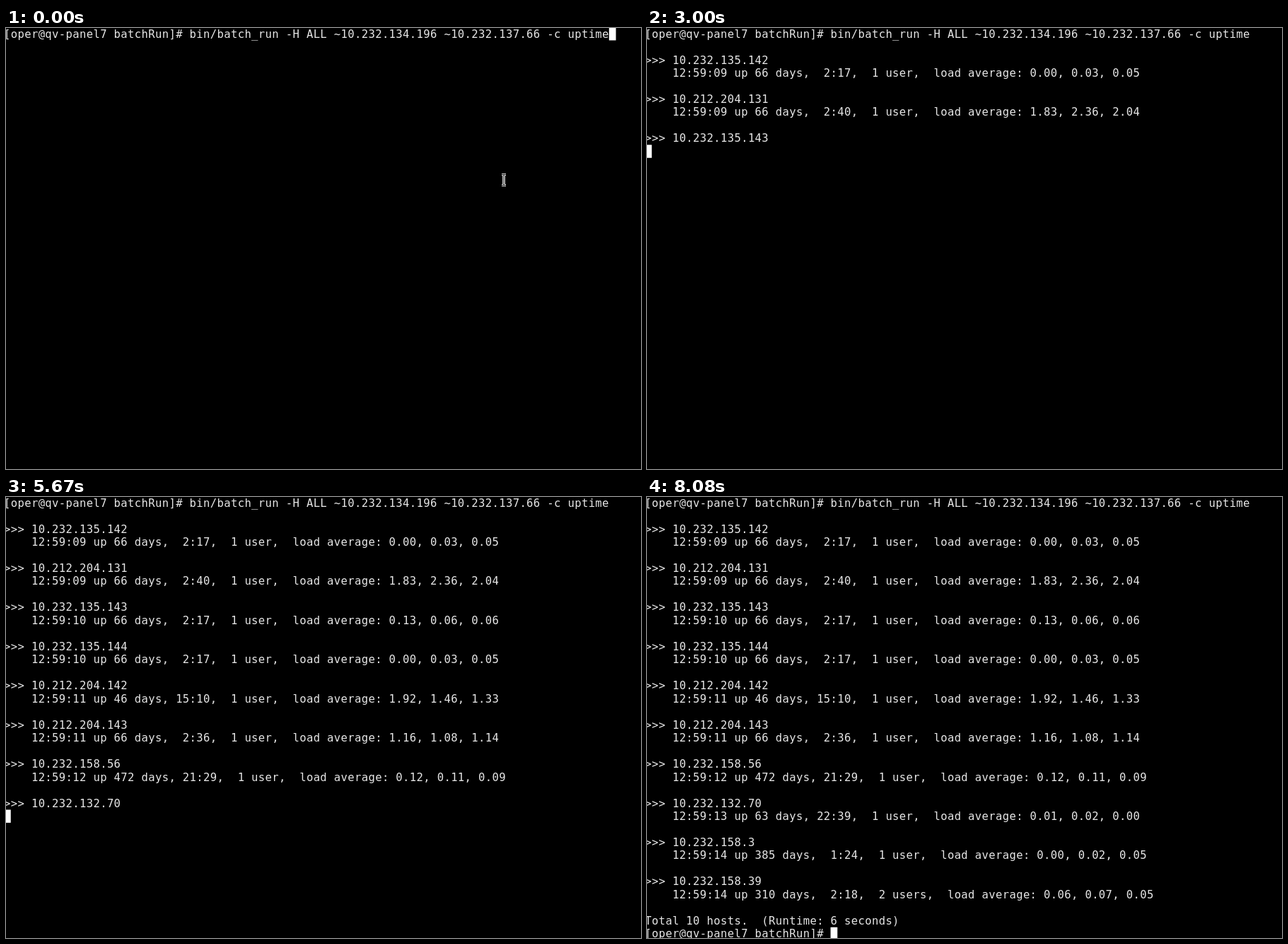
These frames come from a looping animation (898 px wide and 624 px high, 8660 ms). An HTML page:

```html
<!DOCTYPE html>
<html lang="en">
<head>
<meta charset="utf-8">
<title>Batch uptime</title>
<style>
html, body { margin: 0; width: 100%; height: 100%; overflow: hidden; background: #000; }
pre {
  position: absolute; left: -3px; top: -1px; margin: 0;
  font: 16px/19px "DejaVu Sans Mono", monospace;
  letter-spacing: calc(10px - 1ch);
  color: #e6e6e6;
  transform: scale(.9725); transform-origin: 0 0;
}
#caret { display: inline-block; width: 10px; height: 19px; vertical-align: top; background: #fff; }
#mouse { position: absolute; left: -5px; top: -10px; fill: none; }
</style>
</head>
<body>
<pre><span id="out"></span><span id="caret"></span></pre>
<svg id="mouse" width="10" height="20" viewBox="-5 -10 10 20">
  <path id="beam" d="M-3-7.5H3M0-7.5V7.5M-3 7.5H3" stroke="#fff" stroke-width="3"/>
  <use href="#beam" style="stroke:#000;stroke-width:1"/>
  <path d="M-3-7.5H3M0-7.5V7.5M-3 7.5H3" stroke="#000"/>
</svg>
<script>
const LOOP = 8660;
const prompt = "[oper@qv-panel7 batchRun]# ";

// time shown, address, second, days up, clock, users, load
const hosts = `2000|10.232.135.142|09|66|2:17|1 user|0.00, 0.03, 0.05
2420|10.212.204.131|09|66|2:40|1 user|1.83, 2.36, 2.04
3000|10.232.135.143|10|66|2:17|1 user|0.13, 0.06, 0.06
3500|10.232.135.144|10|66|2:17|1 user|0.00, 0.03, 0.05
4080|10.212.204.142|11|46|15:10|1 user|1.92, 1.46, 1.33
4580|10.212.204.143|11|66|2:36|1 user|1.16, 1.08, 1.14
5080|10.232.158.56|12|472|21:29|1 user|0.12, 0.11, 0.09
5670|10.232.132.70|13|63|22:39|1 user|0.01, 0.02, 0.00
6330|10.232.158.3|14|385|1:24|1 user|0.00, 0.02, 0.05
7250|10.232.158.39|14|310|2:18|2 users|0.06, 0.07, 0.05`.split("\n").map(row => row.split("|"));

const chunks = [
  [0, prompt + "bin/batch_run -H ALL ~10.232.134.196 ~10.232.137.66 -c uptime"],
  [500, "\n"]
];
// each result arrives together with the next heading
let result = "";
for (const [at, ip, sec, days, clock, users, load] of hosts) {
  chunks.push([+at, `${result}\n>>> ${ip}\n`]);
  result = `    12:59:${sec} up ${days} days, ${clock.padStart(5)},  ${users},  load average: ${load}\n`;
}
chunks.push([8000, `${result}\nTotal 10 hosts.  (Runtime: 6 seconds)\n`], [8080, prompt]);

const mousePath = [[0, 704, 215], [1830, 762, 256], [1920, 876, 354], [2000, -50, -50]];

const out = document.getElementById("out");
const mouse = document.getElementById("mouse");
const start = performance.now();

function draw() {
  const t = Math.max(0, performance.now() - start) % LOOP;
  const past = list => list.filter(([at]) => at <= t);
  const text = past(chunks).map(chunk => chunk[1]).join("");
  if (out.textContent !== text) out.textContent = text;
  const [, x, y] = past(mousePath).pop();
  mouse.style.transform = `translate(${x}px, ${y}px)`;
  requestAnimationFrame(draw);
}
draw();
</script>
</body>
</html>
```
